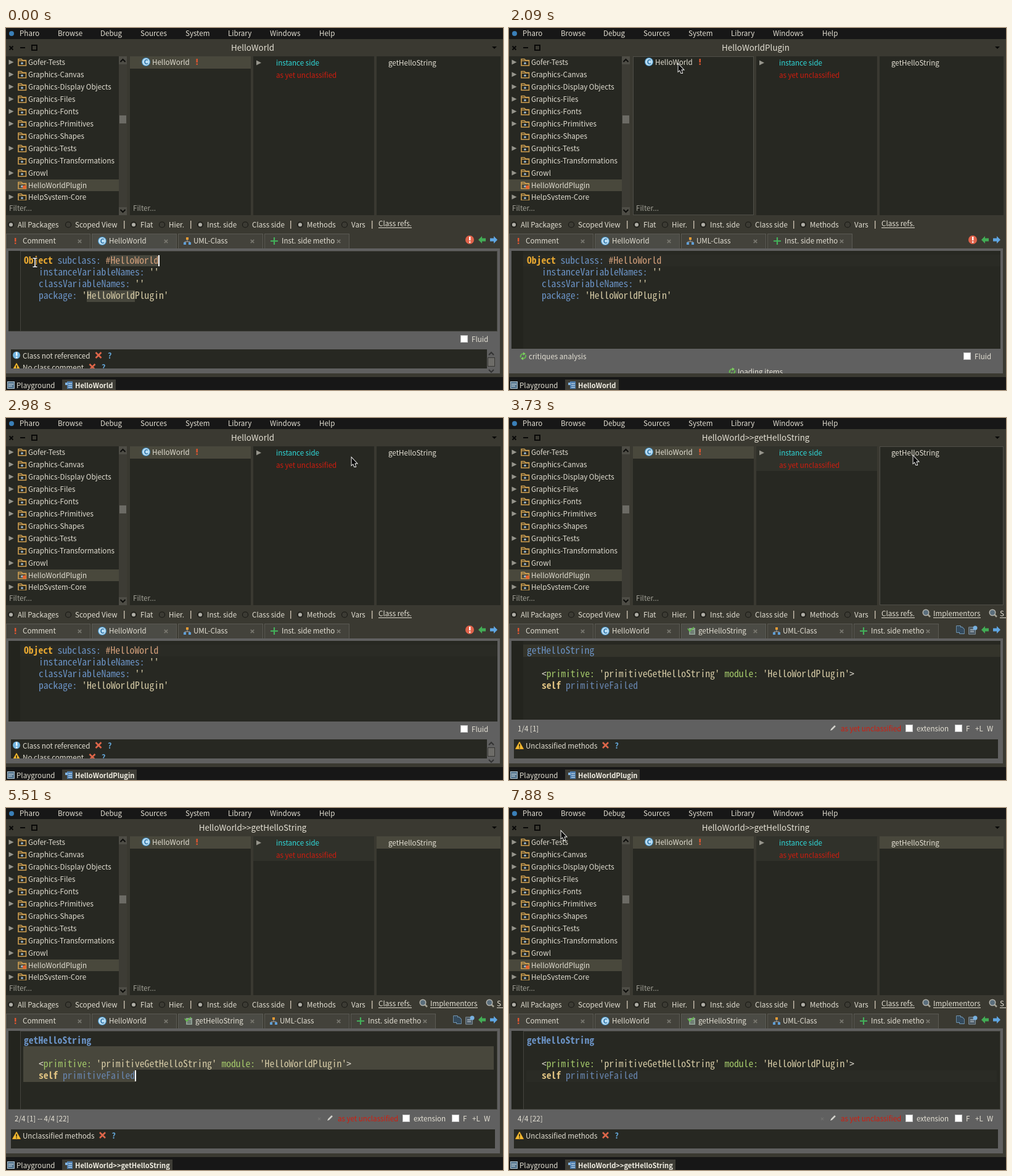
These frames come from a looping animation (806 px wide and 588 px high, 8000 ms). An HTML page with a canvas:

```html
<!DOCTYPE html>
<html lang="en">
<head>
<meta charset="utf-8">
<title>Class browser</title>
<style>
html, body { margin: 0; width: 100%; height: 100%; overflow: hidden; background: #3a3931; }
canvas { display: block; }
</style>
</head>
<body>
<canvas id="stage" width="806" height="588"></canvas>
<script>
const ctx = document.getElementById('stage').getContext('2d');
const LOOP = 8000, CHAR = 7.8;
const SANS = '"Noto Sans CJK SC", "Noto Sans CJK JP", "Noto Sans", sans-serif';
const MONO = '"Noto Sans Mono CJK SC", "Noto Sans Mono CJK JP", "Noto Sans Mono", monospace';
const WIN = '#3a3931', PANE = '#272822', GRAY = '#606060', ROW = '#49483c', INK = '#e4e0d4';
const BLUE = '#6b93c6', STRING = '#d6cba6', GREEN = '#a3c86a', RED = '#d21c0e', DIM = '#a3a298';

// the mono size that gives the editor's character pitch
ctx.font = `100px ${MONO}`;
const monoSize = CHAR * 100 / ctx.measureText('M').width;

function rect(x, y, w, h, color) {
  ctx.fillStyle = color;
  ctx.fillRect(x, y, w, h);
}
function frame(x, y, w, h, color) {
  ctx.strokeStyle = color;
  ctx.lineWidth = 1;
  ctx.strokeRect(x + .5, y + .5, w - 1, h - 1);
}
function text(str, x, y, color = INK, size = 11.6, weight = 400) {
  ctx.font = `${weight} ${size}px ${SANS}`;
  ctx.fillStyle = color;
  ctx.fillText(str, x, y);
}
function code(str, x, line, color, weight = 400) {
  ctx.font = `${weight} ${monoSize}px ${MONO}`;
  ctx.fillStyle = color;
  [...str].forEach((c, i) => ctx.fillText(c, x + i * CHAR, 382.5 + 19 * line));
}
function dot(x, y, r, color) {
  ctx.fillStyle = color;
  ctx.beginPath();
  ctx.arc(x, y, r, 0, 7);
  ctx.fill();
}
function shape(d, x, y, fill, stroke, width = 1) {
  const path = new Path2D(d);
  ctx.save();
  ctx.translate(x, y);
  if (stroke) { ctx.strokeStyle = stroke; ctx.lineWidth = width; ctx.stroke(path); }
  if (fill) { ctx.fillStyle = fill; ctx.fill(path); }
  ctx.restore();
}
function clip(x, y, w, h, draw) {
  ctx.save();
  ctx.beginPath();
  ctx.rect(x, y, w, h);
  ctx.clip();
  draw();
  ctx.restore();
}

const cross = (x, y, r, color, width) => shape(`M${-r} ${-r}L${r} ${r}M${r} ${-r}L${-r} ${r}`, x, y, null, color, width);
const chevron = (x, y, dir, color) => shape(`M-4 ${2 * dir}L0 ${-2 * dir}L4 ${2 * dir}`, x, y, null, color, 2);
const expander = (x, y) => shape('M-4 -4L4 0L-4 4Z', x, y, '#96958c');
const bang = (x, y, color = '#e2552f') => { rect(x - 1, y - 5, 2.4, 6, color); rect(x - 1, y + 2.5, 2.4, 2.3, color); };
const check = (x, y) => { rect(x, y, 12, 12, '#fff'); frame(x, y, 12, 12, '#c4c4c4'); };

function classIcon(x, y) {
  dot(x, y, 7, '#3f8dc0');
  dot(x, y, 6, '#b9dcf2');
  text('C', x - 3.2, y + 4, '#256da4', 10.5, 700);
}
function folder(x, y, marked) {
  shape('M-6 5.5V-5H-1L1 -3H6.5V5.5Z', x, y, null, '#cf9f50', 1.6);
  rect(x - 6, y - 3, 12, 1.4, '#cf9f50');
  dot(x, y + 1.8, 1.8, '#9db9cf');
  if (marked) dot(x + 4, y + 3, 3, '#e2632f');
}
function umlIcon(x, y) {
  shape('M0 -2V1M-4 4V1H4V4', x, y, null, '#a3a3a3');
  rect(x - 2, y - 6, 4, 4, '#e79b35');
  rect(x - 6, y + 2, 4, 4, '#5f9ed6');
  rect(x + 2, y + 2, 4, 4, '#5f9ed6');
}
function lens(x, y) {
  shape('M3 3L7 7', x, y, null, '#a5a294', 2.5);
  dot(x, y, 5.5, '#b5b5ae');
  dot(x, y, 4, '#5b6e7c');
}
function warning(x, y) {
  shape('M0 -6L6.5 5.5H-6.5Z', x, y, '#f3bc32', '#d48a1c');
  rect(x - .8, y - 2.5, 1.7, 4.5, '#352b12');
  rect(x - .8, y + 3, 1.7, 1.5, '#352b12');
}
function sync(x, y) {
  shape('M-4 2A4.5 4.5 0 0 1 0 -4M4 -2A4.5 4.5 0 0 1 0 4', x, y, null, '#65b64f', 2.2);
  shape('M0 -6.5L4 -4L0 -1ZM0 6.5L-4 4L0 1Z', x, y, '#7fce62');
}
function arrow(x, y, dir, color) {
  shape(`M${6 * dir} 0L0 -6V-2.5H${-6 * dir}V2.5H0V6Z`, x, y, color);
}

function drawTop(t) {
  rect(0, 0, 806, 588, WIN);
  rect(0, 0, 806, 18, '#171717');
  dot(9, 9, 4, '#3a7fb8');
  [['Pharo', 22], ['Browse', 84], ['Debug', 153], ['Sources', 218], ['System', 291],
    ['Library', 360], ['Windows', 428], ['Help', 508]].forEach(([s, x]) => text(s, x, 13));
  cross(8.5, 32.5, 3, '#090908', 2);
  rect(23, 31, 8, 2, '#090908');
  ctx.strokeStyle = '#090908';
  ctx.lineWidth = 2;
  ctx.strokeRect(42, 28, 8, 8);
  shape('M-4 -2H4L0 2Z', 792, 32, '#090908');
  const title = t >= 3730 ? 'HelloWorld>>getHelloString' : t >= 2090 && t < 2540 ? 'HelloWorldPlugin' : 'HelloWorld';
  ctx.textAlign = 'center';
  text(title, 400, 37, INK, 13.4);
  ctx.textAlign = 'left';
}

function drawPanes(t) {
  [[0, 183], [201, 196], [401, 196], [601, 201]].forEach(([x, w]) => rect(x, 46, w, 258, PANE));
  rect(0, 246, 183, 19, ROW);
  const tree = ['Gofer-Tests', 'Graphics-Canvas', 'Graphics-Display Objects', 'Graphics-Files', 'Graphics-Fonts',
    'Graphics-Primitives', 'Graphics-Shapes', 'Graphics-Tests', 'Graphics-Transformations', 'Growl',
    'HelloWorldPlugin', 'HelpSystem-Core'];
  clip(0, 46, 183, 234, () => tree.forEach((name, i) => {
    const y = 55.5 + 20 * i - (i > 10 ? 1 : 0);
    if (![6, 8, 10].includes(i)) expander(8.5, y);
    folder(26, y, i === 10);
    text(name, 36, y + 4.5);
  }));
  text('Filter...', 5, 297, DIM);
  text('Filter...', 206, 297, DIM);
  rect(183, 46, 13, 258, '#3d3c35');
  rect(183, 46, 13, 13, '#4e4d46');
  rect(183, 291, 13, 13, '#4e4d46');
  chevron(189.5, 53, 1, '#0d0d0b');
  chevron(189.5, 297, -1, '#0d0d0b');
  rect(184, 142, 11, 13, '#6c6b65');

  if (t < 2090 || t >= 2680) rect(201, 46, 196, 20, ROW);
  if (t >= 1790 && t < 2680) frame(201, 46, 196, 258, '#4f4e47');
  if (t >= 3730) rect(401, 46, 196, 40, '#30312a');
  if (t >= 4030) rect(601, 46, 201, 20, ROW);
  if (t >= 3730 && t < 4770) frame(601, 46, 201, 258, '#4f4e47');
  classIcon(227, 55);
  text('HelloWorld', 237, 60);
  bang(309.5, 55);
  expander(410, 56.5);
  text('instance side', 438, 61, '#2fdada');
  text('as yet unclassified', 438, 81, RED);
  text('getHelloString', 620, 61);
}

function link(str, x, width) {
  text(str, x, 322);
  rect(x, 324, width, 1, INK);
}

function drawOptions(method) {
  [['All Packages', 8, 1], ['Scoped View', 101], ['Flat', 207, 1], ['Hier.', 253], ['Inst. side', 315, 1],
    ['Class side', 388], ['Methods', 477, 1], ['Vars', 549]].forEach(([s, x, on]) => {
    dot(x, 319.5, 5, '#171713');
    dot(x, 319.5, 4, on ? '#33322b' : '#3c3b34');
    if (on) dot(x, 319.5, 3, '#b0afa8');
    text(s, x + 11, 324);
  });
  [191, 299, 461, 593].forEach(x => rect(x, 313, 1.4, 13, '#c9bfae'));
  link('Class refs.', 604, 54);
  if (!method) return;
  lens(676, 316);
  link('Implementors', 688, 77);
  lens(784, 316);
  link('S', 796, 10);
}

function drawTabs(method) {
  const tabs = ['Comment', 'HelloWorld', 'UML-Class', 'Inst. side method'];
  if (method) tabs.splice(2, 0, 'getHelloString');
  tabs.forEach((name, i) => {
    const x = i * 140, active = name === (method ? 'getHelloString' : 'HelloWorld');
    const left = i ? x - 1 : 0, width = x + 137 - left;
    rect(left, 334, width, 24, active ? '#4b4b45' : '#43423b');
    frame(left, 334, width, 25, '#5b5a54');
    if (name === 'Comment') bang(15, 346);
    else if (name === 'HelloWorld') classIcon(x + 16, 346);
    else if (name === 'UML-Class') umlIcon(x + 14, 346);
    else if (name === 'getHelloString') {
      shape('M-4 -5H6V6H-4Z', x + 16, 346, '#8d9d92');
      shape('M-2 0H4M-2 3H4', x + 16, 346, null, '#39443c');
      shape('M-6 -4L-3 0L4 -6', x + 16, 346, null, '#62b74b', 2);
    } else shape('M-6 0H6M0 -6V6', x + 15, 346, null, '#43b05a', 2.2);
    const tx = x + (name === 'UML-Class' ? 24 : 27);
    clip(tx, 336, x + 113 - tx, 20, () => text(name, tx, 350));
    cross(x + 119.5, 346.5, 2.7, '#77766e', 1.8);
  });
  if (method) {
    shape('M-6 -6H0V4H-6ZM-1 -4H3L6 -1V6H-1Z', 732, 344, '#344a5c', '#86b5da', 1.3);
    shape('M-6 -5H4V6H-6Z', 752, 345, '#4f5d68', '#a9c1d2', 1.2);
    shape('M-4 -1H2M-4 2H2', 752, 345, null, '#d2dce3');
    dot(756, 341, 3.5, '#78b0df');
  } else {
    dot(752, 344, 7, '#df6149');
    bang(752, 344, '#fff');
  }
  arrow(772, 344, -1, '#42ad55');
  arrow(791, 344, 1, '#5fa6e2');
}

const caret = (x, line) => rect(x, 369 + 19 * line, 2, 18, '#fff');

function drawEditor(t, method, loading) {
  const focus = t < 1790 || t >= 4770;
  const bottom = loading ? 521 : method ? 490 : 493;
  rect(0, 358, 801, 203, GRAY);
  rect(4, 362, 793, bottom - 362, PANE);
  rect(4, 362, 19, bottom - 362, '#23241e');
  if (focus) {
    frame(23, 362, 774, bottom - 362, '#45453f');
    rect(4, bottom - 1, 793, 1, '#45453f');
  }
  if (method) drawMethod(t, focus);
  else drawDefinition(t, focus);
}

function drawDefinition(t, focus) {
  const mark = '#47473d';
  if (!focus) rect(23, 368, 774, 19, '#2a2b25');
  if (t < 150) {
    rect(169, 369, 78, 18, mark);
    rect(131, 426, 78, 19, mark);
  } else if (t >= 300 && focus) rect(29, 369, 47, 18, '#58523f');
  code('Object', 29, 0, '#e8a831', 700);
  code('subclass:', 29 + 7 * CHAR, 0, BLUE);
  code('#HelloWorld', 29 + 17 * CHAR, 0, '#d6a17c');
  [['instanceVariableNames:', "''"], ['classVariableNames:', "''"], ['package:', "'HelloWorldPlugin'"]].forEach(([key, val], i) => {
    code(key, 53, i + 1, BLUE);
    code(val, 53 + (key.length + 1) * CHAR, i + 1, STRING);
  });
  if (focus) caret(t < 150 ? 247 : t < 300 ? 44 : 75, 0);
}

function drawMethod(t, focus) {
  const selected = '#48473c';
  if (!focus) rect(23, 368, 774, 20, '#34342b');
  if (t >= 5360 && t < 6550) {
    rect(28, 387, 763, 38, selected);
    if (t >= 5510) rect(28, 425, 182, 20, selected);
  } else if (t >= 6550) rect(28, 426, 763, 19, '#2a2b25');
  code('getHelloString', 29, 0, BLUE, focus ? 700 : 400);
  let x = 53;
  [['<', INK], ['primitive: ', GREEN], ["'primitiveGetHelloString' ", STRING], ['module: ', GREEN],
    ["'HelloWorldPlugin'", STRING], ['>', INK]].forEach(([s, color]) => {
    code(s, x, 2, color);
    x += s.length * CHAR;
  });
  code('self', 53, 3, '#e2c483', 700);
  code('primitiveFailed', 53 + 5 * CHAR, 3, '#6886b0');
  if (t >= 4910 && t < 5360) caret(28, 1);
  else if (t >= 5360 && t < 5510) caret(560, 2);
  else if (t >= 5510 && t < 7150) caret(209, 3);
}

function critique(label, y, x) {
  text(label, 27, y + 5);
  cross(x, y, 4.5, '#de664a', 2.6);
  text('?', x + 15, y + 5, '#65a9db', 12.5, 700);
}

function drawFooter(t, method, loading) {
  if (method) {
    const status = t < 4910 ? '1/4 [1]' : t < 5360 ? '2/4 [1]' : t < 5510 ? '2/4 [1] -- 3/4 [68]'
      : t < 6550 ? '2/4 [1] -- 4/4 [22]' : '4/4 [22]';
    text(status, 14, 509);
    if (t >= 4770) cross(508, 505, 2, '#70706e', 1.2);
    shape('M-4 4L-3 1L3 -5L5 -3L-1 3Z', 525, 504, '#d2d1cc', '#444');
    text('as yet unclassified', 538, 509, RED);
    check(643, 498);
    text('extension', 661, 509);
    check(723, 498);
    text('F', 741, 509);
    text('+L', 756, 509);
    text('W', 775, 509);
    rect(8, 522, 785, 31, PANE);
    warning(17, 532);
    critique('Unclassified methods', 531.5, 156.5);
    return;
  }
  const y = loading ? 527 : 499;
  check(737, y);
  text('Fluid', 755, y + 11);
  if (loading) {
    sync(23, 533);
    text('critiques analysis', 32, 538);
    clip(300, 540, 200, 21, () => {
      sync(362, 558);
      text('loading items', 371, 563);
    });
    return;
  }
  clip(8, 522, 772, 31, () => {
    rect(8, 522, 772, 31, PANE);
    dot(17, 531.5, 6, '#72b5e0');
    bang(17, 531.5, '#fff');
    critique('Class not referenced', 531.5, 150);
    warning(17, 550.5);
    critique('No class comment', 550.5, 140);
  });
  chevron(787, 529, 1, '#333');
  rect(781, 535, 12, 15, '#6d6c68');
  frame(781, 535, 12, 15, '#373733');
  chevron(787, 557, -1, '#333');
}

function drawTaskbar(t) {
  rect(0, 567, 806, 21, '#171717');
  rect(2, 574, 12, 12, '#53738c');
  frame(2, 574, 12, 12, '#b1c7d5');
  rect(4, 578, 8, 1, '#dce6ec');
  rect(4, 581, 6, 1, '#dce6ec');
  text('Playground', 17, 585);
  const [label, width] = t < 2240 ? ['HelloWorld', 87] : t < 4180 ? ['HelloWorldPlugin', 121] : ['HelloWorld>>getHelloString', 179];
  rect(91, 571, width, 17, '#3e3d36');
  rect(99, 574, 9, 12, '#4f7faf');
  rect(96, 576, 4, 4, '#82b5e3');
  rect(101, 577, 6, 1, '#c9dcea');
  rect(101, 580, 6, 1, '#c9dcea');
  rect(101, 583, 6, 1, '#c9dcea');
  text(label, 112, 585, '#f2efe4', 11.1, 700);
}

// pointer stops: time, x, y, kind (beam, arrow or hidden)
const stops = [
  [0, 47, 381, 'I'], [750, 150, 400, 'I'], [900, 260, 428, 'I'],
  [1200, 285, 300, 'A'], [1350, 293, 106, 'A'], [1500, 284, 80, 'A'], [1640, 274, 58, 'A'],
  [2680, 330, 60, 'A'], [2830, 450, 62, 'A'], [2980, 560, 64, 'A'], [3130, 640, 62, 'A'], [3280, 655, 61, 'A'],
  [4180, 600, 120, 'A'], [4330, 450, 230, 'A'], [4480, 250, 340, 'A'], [4620, 110, 395, 'I'], [4770, 50, 400, 'I'],
  [4910, 31, 398, 'I'], [5360, 100, 412, 'I'], [5510, 0, 0, ''], [5660, 162, 424, 'I'], [5960, 215, 438, 'I'],
  [6110, 265.5, 450, 'I'], [7000, 240, 400, 'I'], [7150, 185, 290, 'A'], [7300, 120, 170, 'A'], [7450, 75, 90, 'A'],
  [7590, 62, 55, 'A'], [7740, 76, 42, 'A'], [7880, 84, 37, 'A']
];

function drawPointer(t) {
  const [, x, y, kind] = stops.findLast(s => s[0] <= t);
  if (kind === 'I') {
    const beam = 'M-3.5 -7H-1L0 -6L1 -7H3.5M-3.5 7H-1L0 6L1 7H3.5M0 -6V6';
    shape(beam, x, y, null, '#111', 3.4);
    shape(beam, x, y, null, '#fff', 1.6);
  } else if (kind === 'A') {
    shape('M.5 .5V12.5L3 10.2L5 15H7L5.5 9.5H9Z', x, y, '#090909', '#fff', 1.8);
  }
}

function tick(now) {
  const t = now % LOOP, method = t >= 3730, loading = t >= 2090 && t < 2830;
  drawTop(t);
  drawPanes(t);
  drawOptions(method);
  drawTabs(method);
  drawEditor(t, method, loading);
  drawFooter(t, method, loading);
  drawTaskbar(t);
  drawPointer(t);
  requestAnimationFrame(tick);
}
requestAnimationFrame(tick);
</script>
</body>
</html>
```
